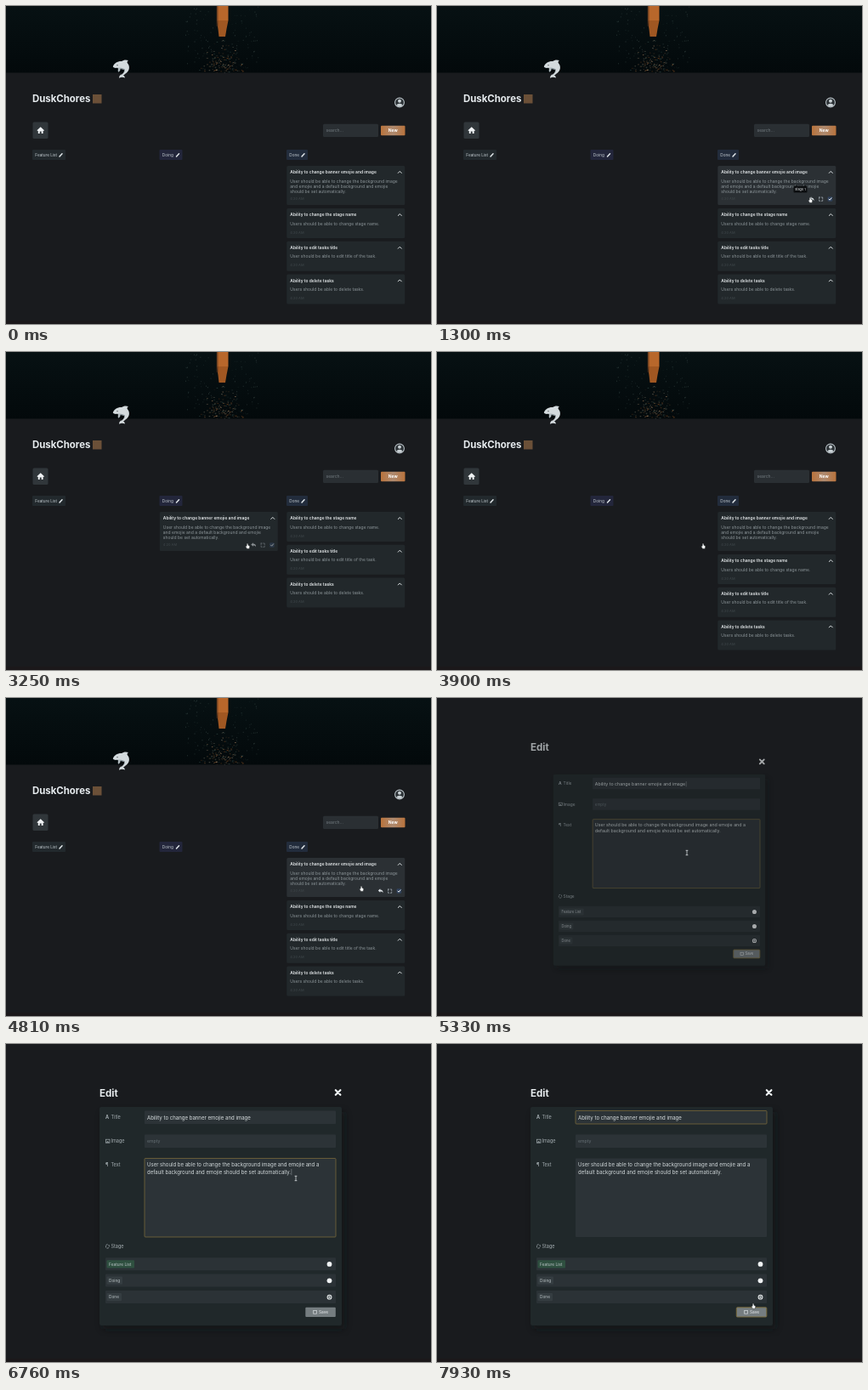
An HTML page that plays this animation: 500x374 px, repeating every 8 s.

```html
<!DOCTYPE html>
<html lang="en">
<head>
<meta charset="utf-8">
<title>Task board</title>
<style>
  html, body { margin: 0; width: 100%; height: 100%; overflow: hidden; background: #191b1e; }
  svg { display: block; width: 500px; height: 374px; }
  text { font-family: Inter, "Open Sans", sans-serif; white-space: pre; }
</style>
</head>
<body>
<svg id="stage" viewBox="0 0 500 374" xmlns="http://www.w3.org/2000/svg"></svg>
<script>
const LOOP = 8000, TICK = 130;
const stage = document.getElementById('stage');

const rect = (x, y, w, h, fill, extra = '') =>
  `<rect x="${x}" y="${y}" width="${w}" height="${h}" fill="${fill}" ${extra}/>`;
// y is the vertical middle of the capitals
const text = (x, y, size, fill, str, weight = 400, extra = '') =>
  `<text x="${x}" y="${y + size * 0.36}" font-size="${size}" fill="${fill}" font-weight="${weight}" ${extra}>${str}</text>`;
const path = (d, fill, extra = '') => `<path d="${d}" fill="${fill}" ${extra}/>`;
const line = (d, color, width = 1) =>
  path(d, 'none', `stroke="${color}" stroke-width="${width}" stroke-linecap="round" stroke-linejoin="round"`);
const group = (id, body, extra = '') => `<g id="${id}" ${extra}>${body}</g>`;

function seeded(seed) {
  return () => (seed = (seed * 16807) % 2147483647) / 2147483647;
}

function banner() {
  const rnd = seeded(71);
  let out = rect(0, 0, 500, 78.5, 'url(#night)');
  // dim windows on both sides of the street
  for (let i = 0; i < 110; i++) {
    const side = i % 2 ? 1 : -1;
    out += rect(254 + side * (11 + rnd() * 32), rnd() * 74, 1, 1.4, '#4a5c58', `opacity="${0.1 + rnd() * 0.35}"`);
  }
  out += rect(248, 0, 13.5, 17, '#b8672b') + path('M248 17H261.5L259.5 27L258 36H250.5L249.5 27Z', '#a05722');
  out += rect(247.5, 0, 2, 24, '#4b2e1c', 'opacity=".6"');
  // traffic and lamps, spreading towards the viewer
  for (let i = 0; i < 150; i++) {
    const y = 34 + 44 * Math.sqrt(rnd()), spread = 4 + (y - 34) * 0.75;
    out += rect(255 + (rnd() + rnd() - 1) * spread, y, 1 + rnd(), 1,
      ['#7d4a22', '#68665a', '#94765a', '#352a20', '#2f4744'][i % 5], `opacity="${0.3 + rnd() * 0.5}"`);
  }
  return out;
}

function dolphin() {
  return path('M125.8 71.5C127 67.5 131 64.8 136 65C138 63.3 141.5 63 144 64C142.5 65 142.4 66 142.8 67C146 70.5 145.5 75.5 142 78.5C140 80.2 138.5 81 138 81.8C139.5 82.5 140 83.5 139.8 84.5C137.5 83.6 136 83.4 133 84.8C133 82 134.5 80.8 136.3 80.6C138.8 78.6 139.8 76.5 139 74.8C136 74.2 133 74 130.5 72.8C128.5 73.2 126.5 72.6 125.8 71.5Z', '#d3dadd') +
    path('M130.5 72.8C134 72.4 138 72.6 140 74.6C140.3 77 139 79 136.3 80.6C138.8 78.6 139.8 76.5 139 74.8C136 74.2 133 74 130.5 72.8Z', '#8c999f') +
    path('M134.5 73.2C134.8 75.4 134 77 132 77.8C131.6 76 131.6 74.4 132.4 72.8Z', '#b4bec3') +
    '<circle cx="131" cy="69.6" r=".6" fill="#222a2e"/>';
}

const pencil = x => line(`M${x} 176.9L${x + 3} 173.7`, '#dfe5e8', 1.5);

function column(x, w, name, fill) {
  return rect(x, 169, w, 12, fill, 'rx="1"') + text(x + 3.3, 175, 4.7, '#c3cbd1', name) + pencil(x + w - 7);
}

function card(id, h, title, lines) {
  let body = rect(0, 0, 139, h, '#22282b', 'rx="1.5" class="face"') +
    text(4, 7.4, 4.95, '#e3e7e9', title, 600) + line('M131 8.4L133 6.4L135 8.4', '#dfe4e6', 1);
  lines.forEach((s, i) => body += text(4, 17.8 + i * 6, 5, '#8d969a', s));
  body += text(4, h - 7, 4, '#41494d', '4:20 AM');
  if (id === 'card0') body += group('tools',
    path('M107.5 38.5L110 36.3V37.6C112.3 37.6 113.4 38.9 113.2 41.2C112.4 39.8 111.5 39.5 110 39.5V40.8Z', '#dfe4e8') +
    line('M119.3 37H120.3M122 37H123.4V38.5M123.4 40V41.3H122M120.3 41.3H119.3V40M119.3 38.5V37', '#aeb7bd', .7) +
    rect(129.3, 36.2, 5.6, 5.6, '#31425c', 'rx="1"') +
    line('M130.7 39.1L131.8 40.2L133.8 37.8', '#f1f4f6', 1));
  return group(id, body);
}

function board() {
  return banner() + dolphin() +
    text(31, 109.2, 11.4, '#e6ebee', 'DuskChores', 700) +
    rect(102, 104, 10.5, 10.5, '#6b5038') +
    '<circle cx="463" cy="113.5" r="5.4" fill="#2b3135" stroke="#b7c0c5" stroke-width="1.1"/>' +
    '<circle cx="463" cy="111.8" r="2" fill="#c8d0d4"/>' + path('M459.5 117C460 114 466 114 466.5 117C464.5 118.6 461.5 118.6 459.5 117Z', '#c8d0d4') +
    rect(31.5, 136.5, 18, 19.5, '#30363a', 'rx="1.5"') +
    path('M36.4 146.3L40.7 142.2L45 146.3L44.1 147.1L43.6 146.7V150H41.7V147.6H39.7V150H37.8V146.7L37.3 147.1Z', '#f0f3f5') +
    rect(373, 138.7, 65, 15.3, '#2a2f33', 'rx="1.5"') + text(376.5, 146.5, 5, '#737c81', 'search...') +
    rect(441, 140.8, 28.5, 11.5, 'url(#orange)', 'rx="1"') + text(455.2, 146.5, 5, '#fff', 'New', 700, 'text-anchor="middle"') +
    column(31, 39, 'Feature List', '#22292d') + column(180.5, 27, 'Doing', '#23263b') + column(330, 25, 'Done', '#222c3c') +
    card('card0', 46, 'Ability to change banner emojie and image', [
      'User should be able to change the background image',
      'and emojie and a default background and emojie',
      'should be set automatically.']) +
    card('card1', 35, 'Ability to change the stage name', ['Users should be able to change stage name.']) +
    card('card2', 35, 'Ability to edit tasks title', ['User should be able to edit title of the task.']) +
    card('card3', 35, 'Ability to delete tasks', ['Users should be able to delete tasks.']) +
    group('tip', rect(419.5, 211.5, 16, 8, '#0c0e10', 'rx="1"') + text(427.5, 215.5, 3.8, '#e7eaec', 'stage 1', 400, 'text-anchor="middle"'));
}

function option(y, name, w, id) {
  const checked = name === 'Done';
  return rect(117, y, 271, 15, '#2b3236', 'rx="1"') +
    rect(118.5, y + 3, w, 9.2, '#353d41', `rx="1" id="${id}"`) +
    text(121, y + 7.6, 4.8, '#b9c2c5', name) +
    `<circle cx="380.5" cy="${y + 7.7}" r="2.9" fill="#f0f3f4"/>` +
    (checked ? `<circle cx="380.5" cy="${y + 7.7}" r="1.9" fill="#3d4549"/><circle cx="380.5" cy="${y + 7.7}" r="1.1" fill="#dfe4e6"/>` : '');
}

function dialog() {
  const field = (id, y, h) => rect(163, y, 225, h, '#2c3337', `rx="1" id="${id}" stroke-width=".8"`);
  const label = (y, s) => text(123.5, y, 5.5, '#a4adb1', s);
  const icon = '#a4adb1';
  return rect(114, 80, 284, 255, '#111416', 'rx="2" opacity=".6" filter="url(#soft)"') +
    rect(110, 74, 285, 257, '#20282a', 'rx="2"') +
    line('M387.8 54.2L393.4 59.8M393.4 54.2L387.8 59.8', '#eef2f3', 2.2) +
    text(117, 86.5, 5.5, icon, 'A', 700) + label(86.5, 'Title') +
    rect(117.4, 112.2, 4.6, 4, 'none', `stroke="${icon}" stroke-width=".7"`) + path('M118 115.7L119.5 114L121.5 115.7Z', icon) + label(114.3, 'Image') +
    text(117, 142, 5.5, icon, '¶', 700) + label(142, 'Text') +
    line('M118 236.3L119.2 235.8M121 236.5L121.4 238M120.5 239.8L119 240.2M117.6 239L117.5 237.8', icon, .8) + label(238, 'Stage') +
    field('titleBox', 78.5, 15.5) +
    text(166, 86.4, 6.05, '#d9dfe1', 'Ability to change banner emojie and image<tspan id="titleCaret" font-weight="300">|</tspan>') +
    field('imageBox', 106.5, 15.5) + text(166, 114.4, 5.2, '#667075', 'empty') +
    field('textBox', 134.5, 92.5) +
    text(166, 142, 6.03, '#d2d9db', 'User should be able to change the background image and emojie and a') +
    text(166, 150.4, 6.03, '#d2d9db', 'default background and emojie should be set automatically.<tspan id="textCaret" font-weight="300">|</tspan>') +
    option(251.2, 'Feature List', 32.5, 'feature') + option(270.6, 'Doing', 18.5, 'doing') + option(290, 'Done', 17.5, 'done') +
    rect(352.3, 309.8, 35.5, 11.2, '#757d80', 'rx="1" id="save"') +
    rect(361.7, 313.4, 3.8, 3.8, 'none', 'stroke="#d9dfe1" stroke-width=".7"') +
    text(368, 315.4, 4.8, '#e8ecee', 'Save');
}

stage.innerHTML = `<defs>
  <linearGradient id="night" x2="0" y2="1"><stop stop-color="#071113"/><stop offset="1" stop-color="#03090b"/></linearGradient>
  <linearGradient id="orange"><stop stop-color="#b9733c"/><stop offset=".5" stop-color="#ad8a70"/><stop offset="1" stop-color="#b9733c"/></linearGradient>
  <filter id="soft"><feGaussianBlur stdDeviation="4"/></filter></defs>` +
  rect(0, 0, 500, 374, '#191b1e') + rect(0, 370, 500, 4, '#1b181a') +
  group('board', board()) +
  group('heading', text(110, 57.8, 11.6, '#e6ebed', 'Edit', 700)) +
  group('dialog', dialog()) +
  group('hand', path('M-.6-2.8C.2-3.2.7-2.8.8-2L1.1-.6C2.3-.6 2.9 0 2.8 1.2L2.2 3.4H-.4L-2.2.9C-2.4.2-1.6 0-1 .5Z', '#f5f7f8', 'stroke="#15181a" stroke-width=".5"')) +
  group('beam', line('M-1-2.7H1M0-2.7V2.7M-1 2.7H1', '#e6eaec', .7));

const el = Object.fromEntries([...stage.querySelectorAll('[id]')].map(n => [n.id, n]));
const face = el.card0.querySelector('.face');
const set = (node, name, value) => node.setAttribute(name, value);
const show = (node, on) => set(node, 'opacity', +on);
const at = (node, x, y) => set(node, 'transform', `translate(${x} ${y})`);
const between = (t, a, b) => t >= a && t < b;

// time, x, y
const route = [
  [520, 400, 100], [910, 426, 214], [1040, 439, 228], [1690, 439, 228], [2730, 284, 228],
  [3250, 284, 228], [3640, 313, 228], [3900, 313, 228], [4680, 418, 224], [5070, 418, 224],
  [5330, 294, 182], [6110, 294, 182], [6500, 341, 158], [6760, 341, 158],
  [7150, 300, 87], [7410, 300, 87], [7930, 372, 308]
];
const ease = p => p * p * (3 - 2 * p);

function cursorAt(t) {
  const i = route.findIndex(k => k[0] > t);
  if (i < 0) return route[route.length - 1].slice(1);
  const [a, b] = [route[Math.max(0, i - 1)], route[i]];
  const p = i ? ease((t - a[0]) / (b[0] - a[0])) : 0;
  return [a[1] + (b[1] - a[1]) * p, a[2] + (b[2] - a[2]) * p];
}

function draw(time) {
  const t = Math.floor(time / TICK) * TICK;
  const editing = t >= 5070, moved = between(t, 1690, 3770);

  show(el.board, !editing);
  at(el.card0, moved ? 180.8 : 330.3, 188);
  for (let i = 1; i < 4; i++) at(el['card' + i], 330.3, 199.4 + i * 38.7 - (moved ? 50 : 0));
  const lit = between(t, 910, 1690) || between(t, 3380, 3770) || between(t, 4290, 5070);
  set(face, 'fill', lit ? '#2b3034' : '#22282b');
  set(el.tools, 'opacity', lit ? 1 : between(t, 2600, 3380) ? 0.55 : 0);
  show(el.tip, between(t, 1300, 1690));

  const p = Math.min(1, Math.max(0, (t - 5070) / 520));
  const scale = 0.5 + 0.5 * (1 - (1 - p) ** 2);
  set(el.dialog, 'opacity', p ** 0.6);
  set(el.heading, 'opacity', p ** 0.6);
  set(el.dialog, 'transform', `translate(324 200) scale(${scale}) translate(-324 -200)`);
  const border = (node, on) => set(node, 'stroke', on ? '#77683a' : 'none');
  border(el.titleBox, t >= 7150);
  border(el.textBox, between(t, 5330, 7150));
  border(el.save, t < 5590 || t >= 7800);
  set(el.titleCaret, 'fill-opacity', +between(t, 5330, 6110));
  set(el.textCaret, 'fill-opacity', +between(t, 6500, 7150));
  set(el.feature, 'fill', t >= 5590 ? '#2f5040' : '#353d41');

  const [x, y] = cursorAt(t);
  const typing = t >= 5330 && y < 227;
  at(el.hand, x, y);
  at(el.beam, x, y);
  show(el.hand, t >= 520 && !typing);
  show(el.beam, typing);
}

const start = performance.now();
function frame() {
  draw((performance.now() - start) % LOOP);
  requestAnimationFrame(frame);
}
frame();
</script>
</body>
</html>
```
